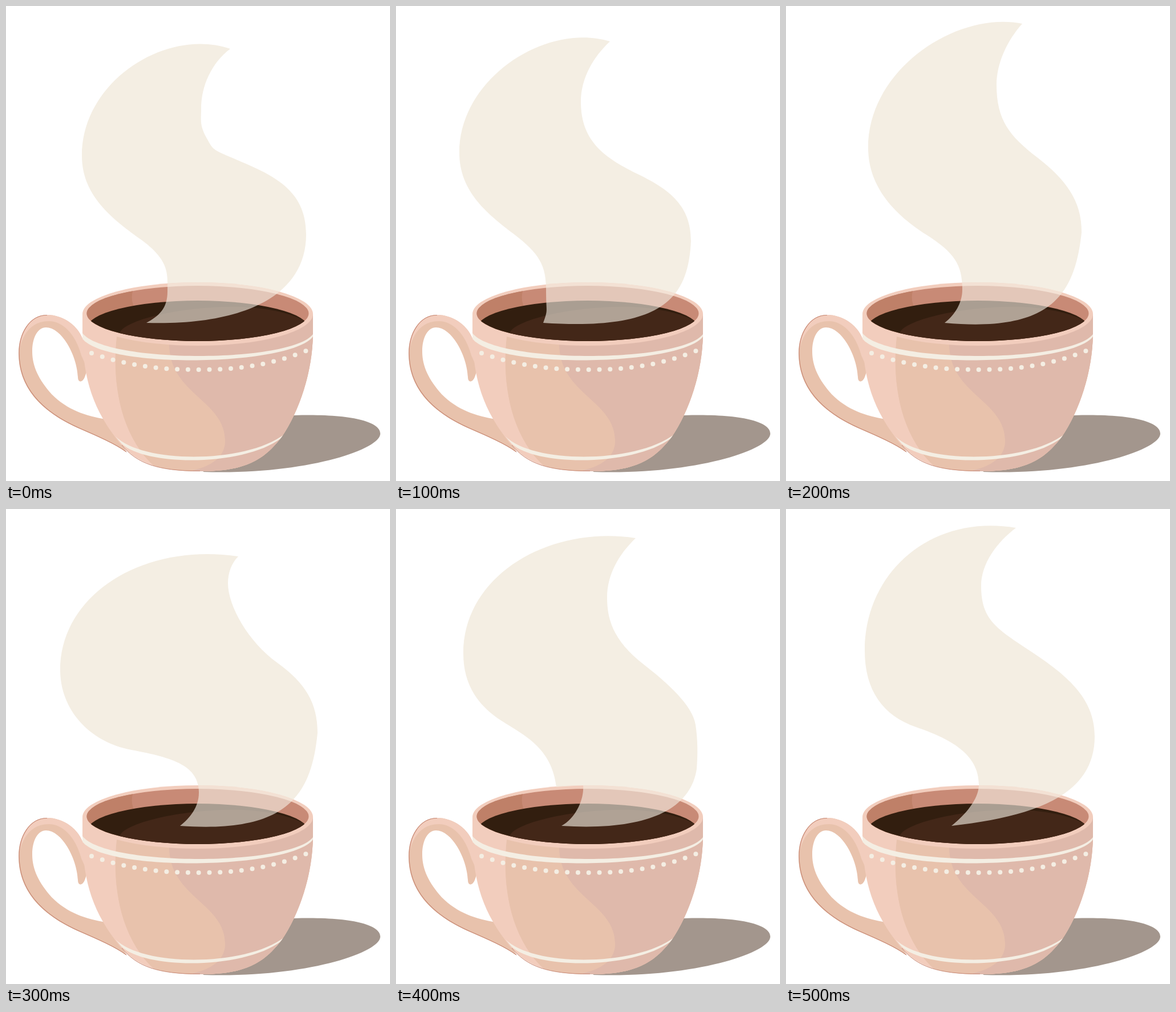
Animation, 673 px wide and 832 px high, one loop 600 ms. Source, as an HTML page with a canvas:

```html
<!DOCTYPE html>
<html lang="en">
<head>
<meta charset="utf-8">
<title>Steaming cup</title>
<style>
  html, body { margin: 0; width: 100%; height: 100%; overflow: hidden; background: #fff; }
  canvas { display: block; }
</style>
</head>
<body>
<canvas id="stage" width="673" height="832"></canvas>
<script>
const ctx = document.getElementById('stage').getContext('2d');
const STEP = 100;

const color = {
  light: '#f2cdbd', tan: '#e8c2ac', rose: '#dfb9ab', edge: '#c88a76',
  inner: '#c88a76', innerDark: '#bf8068',
  coffee: '#432718', coffeeDark: '#321e0f',
  cream: '#f4eee3', shadow: '#a3968d'
};

// Steam outline: left edge runs from the tip down, right edge back up.
const leftEdges = [
  'M393 75C283 37 133 130 133 262C133 330 182 370 235 408S283 470 283 500S268 543 246 555',
  'M375 62C265 28 111 125 111 257C111 325 160 364 206 399S263 455 263 497S267 530 258 555',
  'M414 31C300 8 144 110 144 248C144 320 195 368 245 400S309 452 309 497C309 520 296 541 278 555',
  'M407 83C240 58 95 150 95 282C95 350 145 408 220 422S338 450 338 497C338 522 322 542 305 555',
  'M420 51C270 28 118 115 118 253C118 310 146 346 185 371S273 418 281 487L328 484C330 510 314 542 290 555',
  'M403 33C255 8 138 110 138 248C138 318 170 362 228 382S338 428 338 483C338 508 315 535 290 555'
];
const rightEdges = [
  'C408 560 526 512 526 400C526 330 480 302 420 276S365 255 352 232S342 200 342 180C342 140 360 100 393 75Z',
  'C468 569 512 512 517 412C517 350 480 322 425 295S324 240 324 168C324 127 345 90 375 62Z',
  'C465 572 506 506 518 397C519 340 488 302 440 265S369 200 369 138C369 100 388 60 414 31Z',
  'C490 568 535 505 546 392C546 340 525 305 475 269S389 170 389 130C389 112 395 95 407 83Z',
  'C468 566 519 510 527 455C529 430 529 405 525 378S492 317 435 273S370 190 370 155C370 115 390 80 420 51Z',
  'C440 538 541 500 541 398C541 330 490 290 430 250S342 195 342 135C342 95 370 58 403 33Z'
];
const steam = leftEdges.map((left, i) => new Path2D(left + rightEdges[i]));

function oval(x, y, rx, ry) {
  const p = new Path2D();
  p.ellipse(x, y, rx, ry, 0, 0, Math.PI * 2);
  return p;
}

function fill(shape, style) {
  ctx.fillStyle = style;
  ctx.fill(typeof shape === 'string' ? new Path2D(shape) : shape);
}

function line(d, style, width) {
  ctx.strokeStyle = style;
  ctx.lineWidth = width;
  ctx.stroke(new Path2D(d));
}

function within(shape, draw) {
  ctx.save();
  ctx.clip(shape);
  draw();
  ctx.restore();
}

const rim = oval(336, 539.5, 202, 55.5);
const mouth = oval(336, 538.5, 194.5, 48.5);
const liquid = oval(336, 564.5, 194.5, 48.5);
const body = new Path2D('M134 540V580C136 655 153 708 199 765C228 799 265 815 340 815C420 815 452 795 483 755C515 708 537 640 538 575V540Z');

function drawHandle() {
  fill('M136 588C128 560 100 541 72 541C40 541 22 575 22 608C22 678 75 717 130 741C160 754 190 767 212 782L175 724C140 718 108 708 80 680C58 655 46 632 46 605C46 580 56 563 70 563C97 563 124 610 126 650C126 660 134 660 138 650L143 636Z', color.tan);
  fill('M136 588C128 560 100 541 72 541C40 541 23 575 23 608C27 575 45 552 75 552C100 552 122 575 132 612L141 632Z', color.light);
  line('M72 541.5C40 541.5 23 575 23 608C23 677 75 716 130 740C160 753 190 766 211 781', color.edge, 1.2);
}

function drawBody() {
  fill(body, color.light);
  within(body, () => {
    fill('M196 540L194 580C186 650 196 750 262 808V832H560V540Z', color.tan);
    fill('M286 540V592C286 680 384 690 384 762C384 795 350 810 318 815V832H560V540Z', color.rose);
    fill('M134 573C175 626 497 626 538 575V579C500 630 180 637 134 583Z', color.cream);
    fill('M192 754C240 802 420 802 488 750L482 757C420 805 250 808 203 767Z', color.cream);
  });
  line('M203 769C229 801 265 814.5 340 814.5', color.edge, 1);
  for (let i = 0; i < 21; i++) {
    const x = 150 + i * 18.77;
    const off = (x - 338) / 188;
    const drop = off < 0 ? 29 : 33;
    fill(oval(x, 637 - drop * Math.abs(off) ** 2.3, 4, 4), color.cream);
  }
}

function drawMouth() {
  fill(rim, color.light);
  fill(mouth, color.inner);
  within(mouth, () => {
    fill('M130 480H232C218 500 218 515 226 530V600H130Z', color.innerDark);
    fill(liquid, color.coffeeDark);
    within(liquid, () =>
      fill('M200 572C205 555 280 530 385 527C440 525 490 535 521 550V600H200Z', color.coffee));
  });
}

function draw(now) {
  const puff = steam[Math.floor(now / STEP) % steam.length];
  ctx.fillStyle = '#fff';
  ctx.fillRect(0, 0, 673, 832);
  fill(puff, color.cream);
  fill('M480 717H505C600 714 656 727 656 749C656 778 520 822 345 816L480 740Z', color.shadow);
  drawHandle();
  drawBody();
  drawMouth();
  // Over the cup the steam is see-through.
  within(rim, () => {
    ctx.globalAlpha = 0.62;
    fill(puff, color.cream);
  });
}

const start = performance.now();
function tick() {
  draw(performance.now() - start);
  requestAnimationFrame(tick);
}
tick();
</script>
</body>
</html>
```
